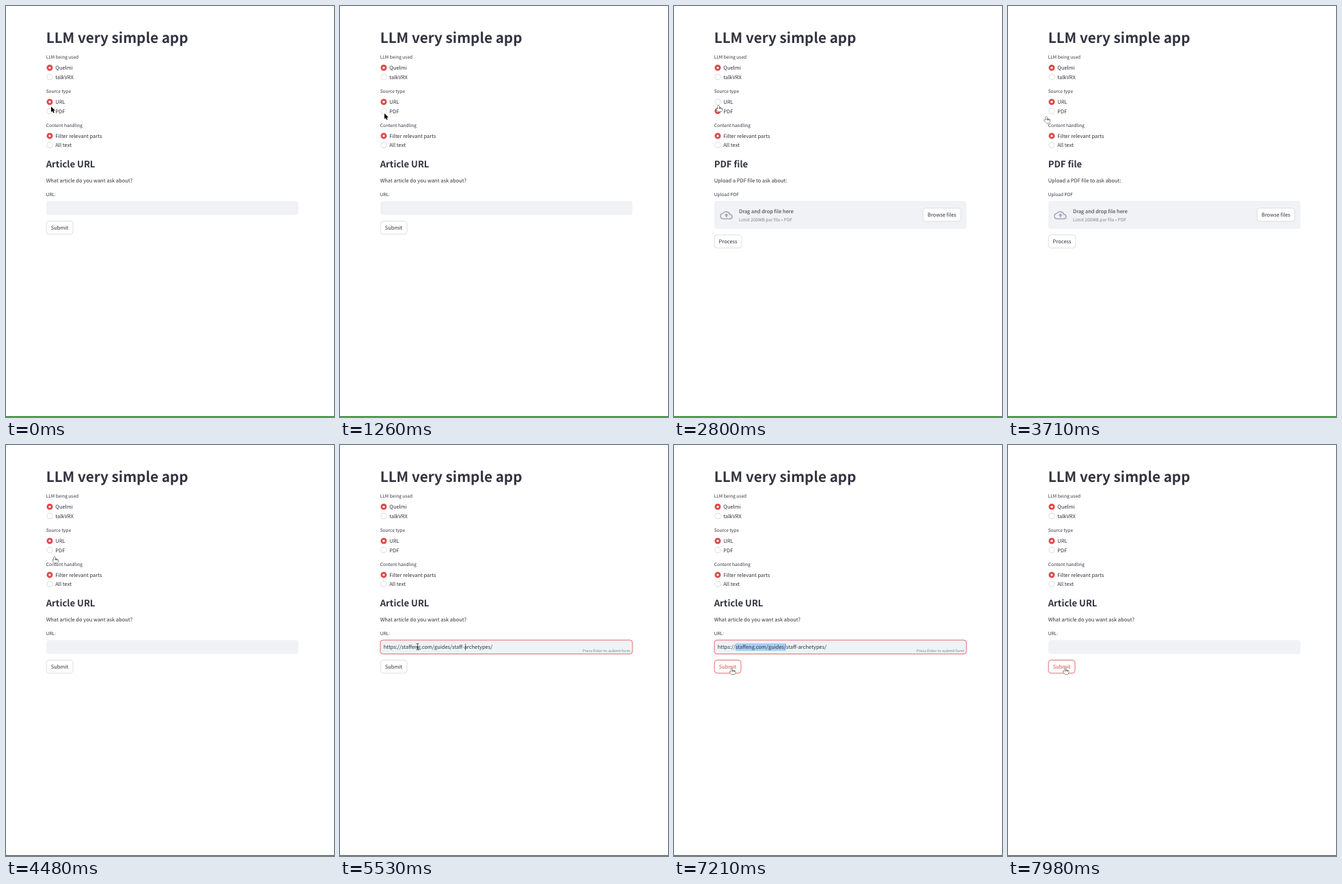
Recreate the animation shown at these times as an HTML page with a canvas. Size 480x601 px, loop 8 s.

```html
<!DOCTYPE html>
<html lang="en">
<head>
<meta charset="utf-8">
<title>LLM very simple app</title>
<style>
  html, body { margin: 0; width: 100%; height: 100%; overflow: hidden; background: #fff; }
  canvas { display: block; width: 480px; height: 601px; }
</style>
</head>
<body>
<canvas id="stage"></canvas>
<script>
const W = 480, H = 601, LOOP = 8000, STEP = 70;
const INK = '#31333f', FADED = '#83858c', RED = '#dc4a48', PANEL = '#f0f2f6', LINE = '#d6d6d9';
const FAMILY = '"Noto Sans CJK JP", "Noto Sans CJK SC", "Noto Sans CJK KR", "Open Sans", sans-serif';
const BODY = 7.53, SMALL = 6.59, TINY = 5.65;
const ADDRESS = 'https://staffeng.com/guides/staff-archetypes/';
const SELECTED = [8, 28];

const canvas = document.getElementById('stage');
const ctx = canvas.getContext('2d');
const dpr = window.devicePixelRatio || 1;
canvas.width = W * dpr;
canvas.height = H * dpr;
ctx.scale(dpr, dpr);
ctx.textRendering = 'geometricPrecision';
ctx.lineJoin = 'round';

const HAND = new Path2D('M-1 6V.9Q0-.5 1 .9V3.6Q2 3 2.6 3.9Q3.6 3.4 4.1 4.3Q5.2 4 5.3 5.2V7Q5 8.6 4.3 9.5H-.3Q-2 7.6-3 6Q-3.2 4.6-2 5z');
const ARROW = new Path2D('M0 0V8.2L1.9 6.5L3.2 9.4L4.7 8.8L3.4 5.9H6z');
const CLOUD = new Path2D('M6 19a5 5 0 0 1-.5-9.97A7.2 7.2 0 0 1 18.4 11a4 4 0 0 1 .6 8z');
const UP = new Path2D('M8 13h2.55v3h2.9v-3H16l-4-4z');

// Pointer path: time, x, y, shape used from then on
const PATH = [
  [0, 66, 147, 'arrow'],
  [350, 66, 180, 'arrow'],
  [490, 66, 180, 'arrow'],
  [800, 54, 172, 'arrow'],
  [1260, 65, 157, 'arrow'],
  [1400, 65, 157, 'hand'],
  [1610, 65, 157, 'hand'],
  [1680, 50, 181, 'arrow'],
  [1820, 50, 181, 'arrow'],
  [2240, 65, 150, 'hand'],
  [2590, 65, 147, 'hand'],
  [2800, 65, 145, 'hand'],
  [3360, 65, 142, 'hand'],
  [3500, 65, 142, 'hand'],
  [3850, 51, 172, 'arrow'],
  [4200, 71, 163, 'hand'],
  [4480, 71, 163, 'hand'],
  [4620, 50, 190, 'arrow'],
  [4760, 42, 225, 'arrow'],
  [5110, 113.5, 295, 'beam'],
  [5740, 113.5, 295, 'beam'],
  [5880, 163, 295, 'beam'],
  [6230, 90, 295, 'beam'],
  [6370, 90, 295, 'beam'],
  [6580, 86, 310, 'arrow'],
  [6720, 84, 322, 'hand'],
  [7140, 84.5, 326, 'hand'],
  [7420, 84.5, 326, 'hand'],
  [7700, 83.5, 325.5, 'hand'],
  [LOOP, 83.5, 325.5, 'hand']
];

const within = (t, a, b) => t >= a && t < b;

function pointerAt(t) {
  let i = 0;
  while (i < PATH.length - 2 && t >= PATH[i + 1][0]) i++;
  const [t0, x0, y0, shape] = PATH[i], [t1, x1, y1] = PATH[i + 1];
  const p = (t - t0) / (t1 - t0), e = p * p * (3 - 2 * p);
  return { x: x0 + (x1 - x0) * e, y: y0 + (y1 - y0) * e, shape };
}

function setFont(size, weight = 400) {
  ctx.font = `${weight} ${size}px ${FAMILY}`;
}

function text(str, x, y, size = BODY, color = INK, weight = 400) {
  setFont(size, weight);
  ctx.fillStyle = color;
  ctx.fillText(str, x, y);
}

function box(x, y, w, h, fill, stroke, r = 4) {
  ctx.beginPath();
  ctx.roundRect(x, y, w, h, r);
  if (fill) {
    ctx.fillStyle = fill;
    ctx.fill();
  }
  if (stroke) {
    ctx.strokeStyle = stroke;
    ctx.lineWidth = 0.8;
    ctx.stroke();
  }
}

function button(label, x, y, w, color = INK, border = LINE) {
  box(x, y, w, 19.2, '#fff', border);
  ctx.textAlign = 'center';
  text(label, x + w / 2, y + 12.4, BODY, color);
  ctx.textAlign = 'left';
}

function disc(x, y, r, color) {
  ctx.fillStyle = color;
  ctx.beginPath();
  ctx.arc(x, y, r, 0, Math.PI * 2);
  ctx.fill();
}

function radios(title, top, labels, chosen) {
  text(title, 58.7, top, SMALL);
  labels.forEach((label, i) => {
    const y = top + 12.9 + i * 13.4, on = i === chosen;
    disc(64, y, 4.5, on ? RED : '#d0d0d4');
    disc(64, y, on ? 1.65 : 3.8, '#fff');
    text(label, 72.3, y + 3);
  });
}

function intro(title, prompt, label) {
  text(title, 58.7, 235.8, 13.15, INK, 600);
  text(prompt, 58.7, 257.6);
  text(label, 58.7, 278.4, SMALL);
}

function pdfForm() {
  intro('PDF file', 'Upload a PDF file to ask about:', 'Upload PDF');
  box(59, 285, 369, 41, PANEL);
  ctx.save();
  ctx.translate(67.2, 296.2);
  ctx.scale(0.79, 0.79);
  ctx.strokeStyle = ctx.fillStyle = '#a3a8b8';
  ctx.lineWidth = 2;
  ctx.stroke(CLOUD);
  ctx.fill(UP);
  ctx.restore();
  text('Drag and drop file here', 95, 302.7);
  text('Limit 200MB per file • PDF', 95, 315.3, SMALL, FADED);
  button('Browse files', 364.4, 295.6, 55.4);
  button('Process', 59.2, 334.7, 39.8);
}

function urlForm(t) {
  const focused = within(t, 5180, 7420), filled = within(t, 5530, 7420);
  intro('Article URL', 'What article do you want ask about?', 'URL:');
  box(59, 285.2, 369, 20.4, PANEL, focused && RED);

  setFont(BODY);
  const edge = n => 63.7 + ctx.measureText(ADDRESS.slice(0, n)).width;
  if (filled) {
    if (t >= 5950) {
      const [a, b] = SELECTED.map(edge);
      const left = b - (b - a) * Math.min(1, (t - 5880) / 350);
      ctx.fillStyle = '#accef7';
      ctx.fillRect(left, 290, b - left, 11);
    }
    text(ADDRESS, 63.7, 298.4);
    ctx.textAlign = 'right';
    text('Press Enter to submit form', 424.7, 303, TINY, FADED);
    ctx.textAlign = 'left';
  }
  if (within(t, 5180, 5880)) {
    ctx.fillStyle = INK;
    ctx.fillRect(edge(filled ? ADDRESS.length : 0), 290.5, 0.7, 10);
  }

  const hover = t >= 6650;
  button('Submit', 59.2, 314.5, 38.8, hover ? RED : INK, hover ? RED : LINE);
  if (within(t, 4200, 4340)) {
    ctx.globalAlpha = 0.4;
    button('Process', 59.2, 342.5, 39.8);
    ctx.globalAlpha = 1;
  }
}

function pointer({ x, y, shape }) {
  ctx.save();
  ctx.translate(x, y);
  if (shape === 'beam') {
    ctx.strokeStyle = '#222';
    ctx.lineWidth = 0.8;
    ctx.stroke(new Path2D('M-1.8-4.6Q0-4.6 0-3.6V3.6Q0 4.6-1.8 4.6M1.8-4.6Q0-4.6 0-3.6M0 3.6Q0 4.6 1.8 4.6M-1 1.2H1'));
  } else {
    const arrow = shape === 'arrow', path = arrow ? ARROW : HAND;
    ctx.lineWidth = arrow ? 1.4 : 0.9;
    ctx.strokeStyle = arrow ? '#fff' : '#111';
    ctx.fillStyle = arrow ? '#000' : '#fff';
    ctx.stroke(path);
    ctx.fill(path);
    if (!arrow) ctx.stroke(new Path2D('M1 3.6V5.2M2.6 3.9V5.3M4.1 4.3V5.5'));
  }
  ctx.restore();
}

function draw(now) {
  const time = now % LOOP, t = time - time % STEP;
  ctx.fillStyle = '#fff';
  ctx.fillRect(0, 0, W, H);

  text('LLM very simple app', 58.7, 54, 20.7, INK, 700);
  radios('LLM being used', 77.4, ['Quelmi', 'talkVRX'], 0);
  radios('Source type', 127.3, ['URL', 'PDF'], within(t, 1680, 3500) ? 1 : 0);
  radios('Content handling', 177, ['Filter relevant parts', 'All text'], 0);
  if (within(t, 2380, 4200)) pdfForm();
  else urlForm(t);

  ctx.fillStyle = '#1b7d1b';
  ctx.fillRect(0, 599.8, W, 1.2);
  pointer(pointerAt(t));
  requestAnimationFrame(draw);
}

requestAnimationFrame(draw);
</script>
</body>
</html>
```
